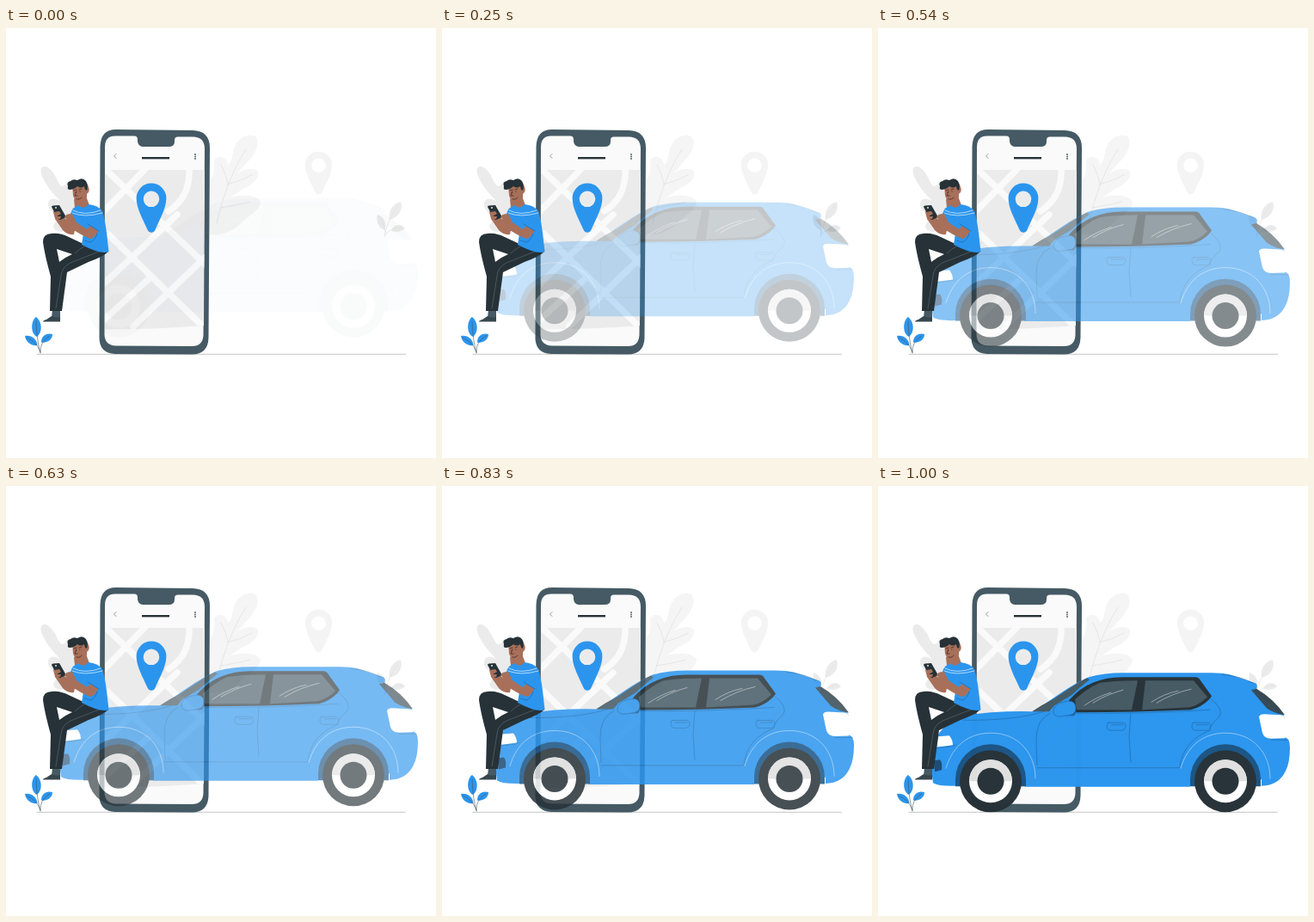
These frames come from a looping animation (500 px wide and 500 px high, 1040 ms). An HTML page:

```html
<!DOCTYPE html>
<html lang="en">
<head>
<meta charset="utf-8">
<title>Ride booking</title>
<style>
html, body { margin: 0; width: 100%; height: 100%; overflow: hidden; background: #fff; }
svg { display: block; width: 100%; height: 100%; }
.line { fill: none; stroke-linecap: round; stroke-linejoin: round; }
.blue { fill: #2b95ee; }
.dark { fill: #263238; }
.slate { fill: #455a64; }
.skin { fill: #a8705a; }
.pale { fill: #ebebeb; }
.seam { stroke: #1b629f; stroke-width: .55; }
.shine { stroke: #fff; stroke-width: .6; opacity: .75; }
</style>
</head>
<body>
<svg viewBox="0 0 500 500">
  <defs>
    <path id="pin" fill-rule="evenodd" d="M0-17.5A17.4 17.4 0 0 1 17.4 0C17.4 12 9 26 4.5 36.5Q3 39.700 0 39.700T-4.5 36.5C-9 26-17.4 12-17.4 0A17.4 17.4 0 0 1 0-17.5ZM0-8.5A9.3 9.3 0 1 0 0 10.1A9.3 9.3 0 1 0 0-8.5Z"/>
    <g id="wheel">
      <path fill="#1b5484" d="M-41 6V-2A41 41 0 0 1 41-2V6Z"/>
      <circle r="36" class="dark"/>
      <circle r="25" fill="#fff"/>
      <path fill="#e0e0e0" d="M-25 0A25 25 0 0 1 25 0Z"/>
      <circle r="15.5" class="dark"/>
      <path class="line shine" d="M-52-15C-44-42-25-56 0-56C32-56 52-33 52-3"/>
    </g>
    <path id="handle" class="line seam" d="M2 0H17Q22 0 22 4Q21 9 17 9H5Q0 9 0 4Q0 0 2 0ZM5 2.5H19"/>
    <clipPath id="screen"><path d="M115 165H231L230 346Q180 350 115 350.500Z"/></clipPath>
  </defs>

  <!-- background plants and pin -->
  <path class="pale" d="M41 163C46 157 55 166 59 176C63 184 66 188 72 178L91 225L65 237Q55 236 55 230Q58 223 66 219Q48 215 49 203Q52 195 63 201Q49 187 45 178Q39 169 41 163Z"/>
  <path fill="#f5f5f5" d="M236 240V178C242 174 243 163 242 154C247 147 256 149 258 159C264 156 262 147 266 138C270 128 281 122 290 126C296 133 291 143 285 151L269 169C278 164 289 162 293 167C295 176 285 183 274 188L261 197C275 193 293 194 296 202C296 212 281 219 273 227C264 237 249 242 236 240Z"/>
  <path class="line" stroke="#e3e3e3" stroke-width=".8" d="M279 141C264 164 253 193 245 227M258 181Q255 168 250 159M257 182Q273 178 286 171M249 209Q264 207 284 202"/>
  <use href="#pin" fill="#f4f4f4" transform="translate(363.500 159) scale(.9 .87)"/>
  <g class="pale">
    <path d="M446 223C444 213 450 204 459 202C462 211 457 220 446 223ZM440 235C432 232 430 223 432 217C440 220 444 228 440 235ZM448 236C450 229 459 226 464 233Q458 239 448 236Z"/>
    <path class="line" stroke="#e3e3e3" stroke-width=".7" d="M456 207Q443 223 440 243M434 220Q441 230 441 239M461 232Q446 232 441 241"/>
  </g>
  <path class="line" stroke="#b5b5b5" stroke-width=".8" d="M36 379.300H464.500"/>

  <!-- large phone -->
  <path class="slate" d="M128 118L217 119Q237 119.500 237 139.500L235.500 360Q235 379.500 216 379.500L127 379Q108 378 108.500 359L109.500 138Q110 118 128 118Z"/>
  <path fill="#fafafa" d="M127 125.500H149Q153 125.500 153 129.500V132Q154 138 160 138H189Q196 138 196 132V130Q196 126.500 200 126.500H217Q231 126.500 231 140.500L229.500 357Q229 370 216 370L128 369.500Q114.500 369 114.500 356L115 138.500Q115 125.500 127 125.500Z"/>
  <g clip-path="url(#screen)">
    <path class="pale" d="M110 160H235V355H110Z"/>
    <path class="line" stroke="#fafafa" stroke-width="7.500" d="M112 161L232 275M118 239L232 350M161 165L112 215M199 217L112 299M232 266L148 347M168 290L112 341M213 163C214 189 204 203 189 213"/>
  </g>
  <path class="line" stroke="#777" stroke-width=".7" d="M128 146.500L125.500 149L128 151.500"/>
  <path class="dark" d="M158 150H190V152.400H158Z"/>
  <g class="slate"><circle cx="220" cy="147" r=".9"/><circle cx="220" cy="149.500" r=".9"/><circle cx="220" cy="152" r=".9"/></g>
  <use href="#pin" class="blue" x="169" y="198"/>

  <g id="car">
    <path class="blue" d="M64 345Q61 328 63 311Q65 296 71 287Q80 275 98 267Q135 261 180 262C203 248 222 232 245 222Q263 217 285 217L388 217Q401 217 409 219L439 229Q442 231 440 236L435 237L465 258Q473 264 473 273V292Q479 293 479 304Q479 321 474 331Q466 348 446 348.500V341H363V349.500H172L165 346H91L90 348.500Q70 349 64 345Z"/>
    <path class="slate" d="M179 262L190 255C211 245 226 231 243 223L246 225Q234 234 225 243L205 255L199 262Z"/>
    <path class="dark" d="M230 263L222 249Q235 234 251 228Q265 222 284 222H369Q373 222 375 226L388 244L385 248Q376 257 364 260Q299 263 230 263Z"/>
    <path class="slate" d="M231 260L229 248Q243 235 257 229Q272 226 302 226L295 260ZM311 226H367L383 245Q373 255 362 257L307 260Z"/>
    <path class="line shine" d="M240 255Q254 245 271 240M250 252Q266 242 285 237M318 251Q333 241 349 238M324 252Q342 241 364 236"/>
    <path fill="#37474f" d="M434 237L440 235.500Q460 247 473 266Q460 264 452 258Z"/>
    <path fill="#fff" d="M443 268Q444 265 449 265L468 266Q472 266 473 270V293L457 293.500Q449 293 447 287ZM70 291L83 290Q87 295 87 301L68 303.500Z"/>
    <path fill="#1b4b75" d="M65 319L72 318Q75 321 74 330L66 332Z"/>
    <path class="line seam" d="M99 272Q158 273 193 262M200 264Q183 272 184 297L185 324M185 327.500H351M230 264Q310 265 386 260M294 264L292 292L294 321M387 247Q402 259 397 268Q386 277 386 284Q355 296 351 326M401 219Q422 221 436 229M436 237L464 264M68 304Q82 304 90 301M457 295H477"/>
    <use href="#handle" x="266" y="275"/>
    <use href="#handle" x="365" y="275"/>
    <path fill="#1b629f" d="M222 263L231 261L228 267H212Z"/>
    <path class="blue" stroke="#1b629f" stroke-width=".6" d="M204 261C205 253 215 250 224 250Q230 251 230 258Q230 264 224 266L211 268Q203 267 204 261Z"/>
    <use href="#wheel" x="131" y="343"/>
    <use href="#wheel" x="404" y="343"/>
  </g>

  <!-- seated person -->
  <path class="slate" d="M54 327H63V338L53 337Z"/>
  <path fill="#37474f" d="M53 335Q58 338 63 336V341.500H43Q43 340 47 339Z"/>
  <path class="dark" fill-rule="evenodd" d="M119 260Q113 266 96 272L71 284L65 329H51L52 289Q45 264 43 249Q43 239 53 239Q64 238 75 244L92 252ZM59 257L62 272Q68 267 77 263Z"/>
  <path class="line" stroke="#617078" stroke-width=".6" d="M108 260L75 273Q65 278 64 288L58 326M91 254Q85 257 80 262"/>
  <path class="skin" d="M79 199L94 198L98 209Q89 214 80 209ZM55 214Q57 209 61 211L68 221L81 230L79 240Q71 241 66 235L57 222Z"/>
  <path class="blue" d="M75 216Q77 208 85 206Q89 212 96 205Q107 206 112 213Q115 222 117 238L119.500 260Q111 264 88 252L90 239L76 228Z"/>
  <path class="skin" d="M70 217L77 216L82 226L94 234L102 226L108 234Q104 244 98 245Q87 241 73 231Z"/>
  <path class="blue" d="M99 211Q109 211 112 224L108 236Q103 234 95 228Z"/>
  <path class="line" stroke="#d6ebfd" stroke-width=".8" d="M78 212Q91 219 110 212M77 215Q91 221 112 215"/>
  <path class="line" stroke="#1b629f" stroke-width=".6" d="M95 228L108 236M106 239Q104 247 98 249L91 247"/>
  <path class="dark" d="M53 208Q53 206.500 55 206.500L62 206L70 220L63 223Q61 223 60 221Z"/>
  <circle cx="58" cy="209" r="1" fill="#dce4e8"/>
  <path class="skin" d="M56 214L62 213L64 216L59 219L64 219L63 222L58 222ZM68 219L74 216L79 222L75 230Z"/>
  <path class="skin" d="M77 184L94 181Q98 187 96 191L94 193Q95 202 88 204Q81 204 78 195Z"/>
  <path class="dark" d="M72 184Q70 179 75 178Q78 175 83 177Q89 173 93 178Q96 183 94 189L92 188L91 184Q87 187 83 184Q79 188 74 188Q71 188 72 184Z"/>
  <path class="line" stroke="#432c29" stroke-width=".8" d="M79 189L82 188M85 188L88 187M82 190L80 195L83 195M82 199Q86 200 88 197M81 191V191.500M86 190V190.500"/>

  <!-- front plant -->
  <path class="blue" d="M36 359C28 355 29 340 35 336C42 341 43 354 36 359ZM36.500 369C29 370 23 365 22 358C30 357 36 362 36.500 369ZM41 365.500C41 358 47 354 54 356C54 363 47 366.500 41 365.500Z"/>
  <path class="line" stroke="#455a64" stroke-width=".6" d="M35 341Q36 365 40 378M24 360Q36 365 40 377M51 358Q39 365 40 377"/>
</svg>
<script>
const car = document.getElementById("car");
const loop = 1040, steps = 25, fade = 1000, drop = 20;

function draw(now) {
  const step = Math.floor((now % loop + 2) * steps / loop) % steps;
  // The car starts faintly visible and ends just short of opaque.
  const progress = Math.min(.99, .02 + step * loop / steps / fade);
  car.setAttribute("opacity", progress);
  car.setAttribute("transform", `translate(0 ${.4 - drop * (1 - progress)})`);
}

const start = performance.now();
function tick() {
  draw(performance.now() - start);
  requestAnimationFrame(tick);
}
tick();
</script>
</body>
</html>
```
